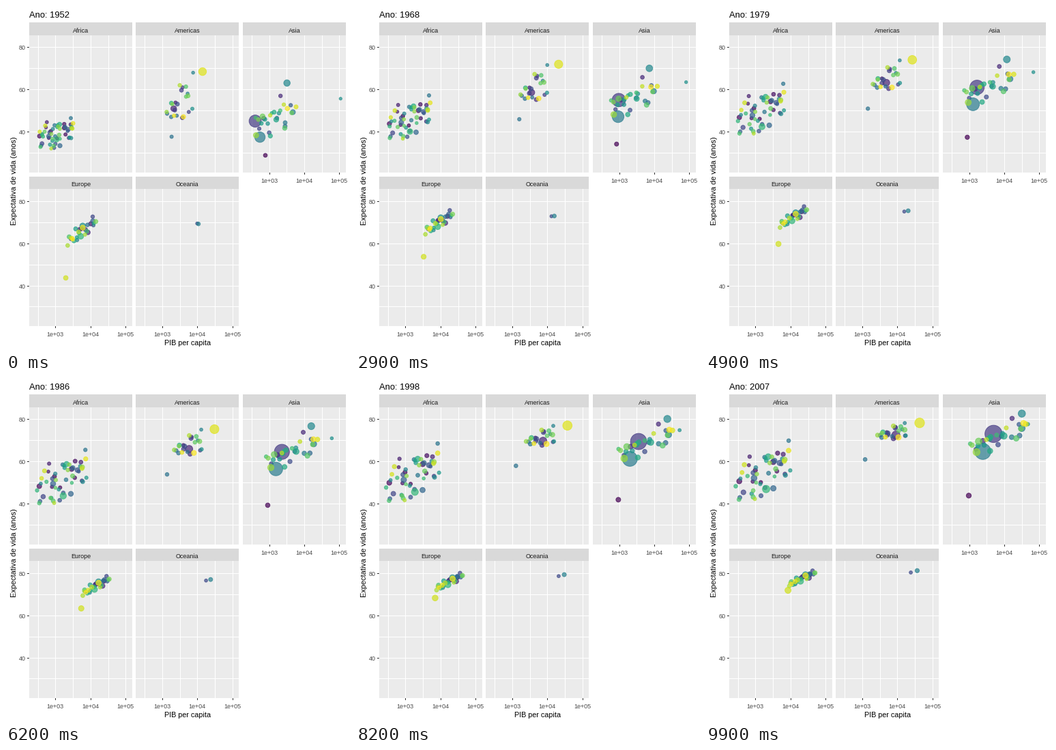
Animation of 504x504 px, one loop 10000 ms. Source, as a matplotlib script:

```python
import numpy as np
import matplotlib.pyplot as plt
from matplotlib.animation import FuncAnimation
from matplotlib.patches import Rectangle

SIZE, FRAMES = 504, 100
W, H = 151, 201
DECADE, YEAR = 51.44, 3.097          # pixels per decade of income, per year of life
plt.rcParams["font.family"] = ["Liberation Sans", "DejaVu Sans"]
rng = np.random.default_rng(12)

NAMES = ["Africa", "Americas", "Asia", "Europe", "Oceania"]

# Stand-out dots: panel, hue, then (income, life, millions) at start and end
LEADS = [
    (0, 95, (1077, 36.3, 33), (2014, 46.9, 135)),
    (0, 108, (493, 40, 2.5), (863, 46.2, 8.9)),
    (1, 15, (2109, 50.9, 57), (9066, 72.4, 190)),
    (1, 54, (1840, 37.6, 3.2), (1202, 60.9, 8.5)),
    (1, 135, (13990, 68.4, 158), (42952, 78.2, 301)),
    (2, 1, (779, 28.8, 8.4), (975, 43.8, 32)),
    (2, 25, (400, 45, 556), (4959, 73, 1319)),
    (2, 59, (547, 37.4, 372), (2452, 64.7, 1110)),
    (2, 67, (3217, 63, 86), (31656, 82.6, 127)),
    (2, 72, (108382, 55.6, .2), (47307, 77.6, 2.5)),
    (3, 132, (1969, 43.6, 22), (8458, 71.8, 71)),
]
DIPS = {25: (1962, 9), 108: (1992, 22)}   # hue: year, years of life lost

# Crowds: count, typical millions, growth, bend, then (log income, spread,
# life, scatter, slope) at start and end
CROWDS = [
    (50, 3, 3.2, .8, (3.02, .28, 39.5, 4, 6), (3.23, .42, 55.5, 6.5, 10)),
    (22, 4, 2.5, .3, (3.50, .20, 54, 5, 15), (3.87, .24, 73.8, 1.8, 4)),
    (28, 8, 2.8, .4, (3.15, .32, 46, 5.5, 9), (3.80, .46, 71, 3.5, 8)),
    (29, 9, 1.3, .3, (3.74, .22, 66, 2, 13), (4.33, .22, 77.6, .9, 8)),
    (2, 4, 2, .1, (4.01, .01, 69.3, .1, 0), (4.47, .05, 80.7, .1, 6)),
]


def corner(panel):
    """Top left of the plotting area, in pixels."""
    row, col = divmod(panel, 3)
    return 33.8 + 156.55 * col, 43 + 225.45 * row


def crowd(panel, count, millions, growth, bend, first, last):
    rank = rng.permutation(np.linspace(-1.7, 1.7, count))
    luck = np.clip(rng.normal(size=count), -1.7, 1.7)
    pop = millions * np.exp(np.clip(rng.normal(size=count), -2, 1.8))
    ends = []
    for (mean, spread, life, scatter, slope), people in ((first, pop), (last, pop * growth)):
        dx = spread * (rank + .15 * rng.normal(size=count))
        ends.append(np.array([mean + dx, life + slope * dx + scatter * luck, people]).T)
    return [(panel, bend, a, b) for a, b in zip(*ends)]


def build():
    dots = []
    for panel, hue, *ends in LEADS:
        a, b = ((np.log10(g), life, pop) for g, life, pop in ends)
        dots.append((hue, panel, .3, a, b))
    free = sorted(set(range(1, 143)) - {d[0] for d in dots})
    hues = iter(rng.permutation(free))
    for panel, spec in enumerate(CROWDS):
        dots += [(next(hues), *dot) for dot in crowd(panel, *spec)]
    dots.sort(key=lambda d: d[0])
    return (np.array(column) for column in zip(*dots))


hues, panels, bends, start, end = build()
corners = np.array([corner(p) for p in panels])


def state(year):
    """Pixel centres and radii of all dots."""
    s = (year - 1952) / 55
    ease = s * (1 + bends * (1 - s))
    x, life, _ = (start + (end - start) * ease[:, None]).T
    pop = start[:, 2] * (end[:, 2] / start[:, 2]) ** s
    for hue, (low, depth) in DIPS.items():
        life = life - (hues == hue) * depth * max(0, 1 - abs(year - low) / 6)
    pos = np.column_stack([(x - 2.2487) * DECADE,
                           (85.553 - np.minimum(life, 82.6)) * YEAR])
    size = 2 + 10 * np.sqrt(np.clip(pop - .06, 0, None) / 1318.6)
    return corners + pos, .375 * (2.845 * size + .94) - .5


fig = plt.figure(figsize=(SIZE / 72, SIZE / 72), dpi=72, facecolor="white")
ax = fig.add_axes([0, 0, 1, 1])
ax.set(xlim=(0, SIZE), ylim=(SIZE, 0))
ax.axis("off")


def box(x, y, w, h, color):
    ax.add_patch(Rectangle((x, y), w, h, fc=color, lw=0, antialiased=False))


def label(x, y, text, size=9, color="black", ha="center", **kw):
    return ax.text(x, y, text, size=size, color=color, ha=ha, va="baseline", **kw)


for panel, name in enumerate(NAMES):
    x0, y0 = corner(panel)
    left, top = round(x0), round(y0)
    strip = 24 + 226 * (panel // 3)
    box(left, strip, W, top - strip, "#d9d9d9")
    box(left, top, W, H, "#ebebeb")
    label(left + W / 2, top - 4, name, color="#1a1a1a")
    for life in range(30, 81, 10):
        y = round(y0 + (85.553 - life) * YEAR)
        box(left, y, W, 1, "white")
        if panel % 3 == 0 and life % 20 == 0:
            box(left - 3, y, 3, 1, "#333333")
            label(left - 5, y + 4, str(life), color="#4d4d4d", ha="right")
    for half in range(5, 11):
        x = round(x0 + (half / 2 - 2.2487) * DECADE)
        box(x, top, 1, H, "white")
        if half % 2 == 0 and panel >= 2:
            box(x, top + H, 1, 3, "#333333")
            label(x, top + H + 15, f"1e+0{half // 2}", color="#4d4d4d")

label(266, 497, "PIB per capita", 10.7)
label(15.5, 256, "Expectativa de vida (anos)", 11, rotation=90, rotation_mode="anchor")
title = label(34, 17, "", 13, ha="left")

colors = plt.get_cmap("viridis")((hues - 1) / 141)
colors[:, 3] = .7
dots = ax.scatter(*corners.T, s=20, facecolors=colors, edgecolors=colors,
                  linewidths=1, zorder=3)


def draw(i):
    year = 1952 + 55 * i / (FRAMES - 1)
    centres, radii = state(year)
    dots.set_offsets(centres)
    dots.set_sizes((2 * radii) ** 2)
    title.set_text(f"Ano: {round(year)}")
    return dots, title


anim = FuncAnimation(fig, draw, frames=FRAMES, interval=100, repeat=True, repeat_delay=0)
plt.show()
```
